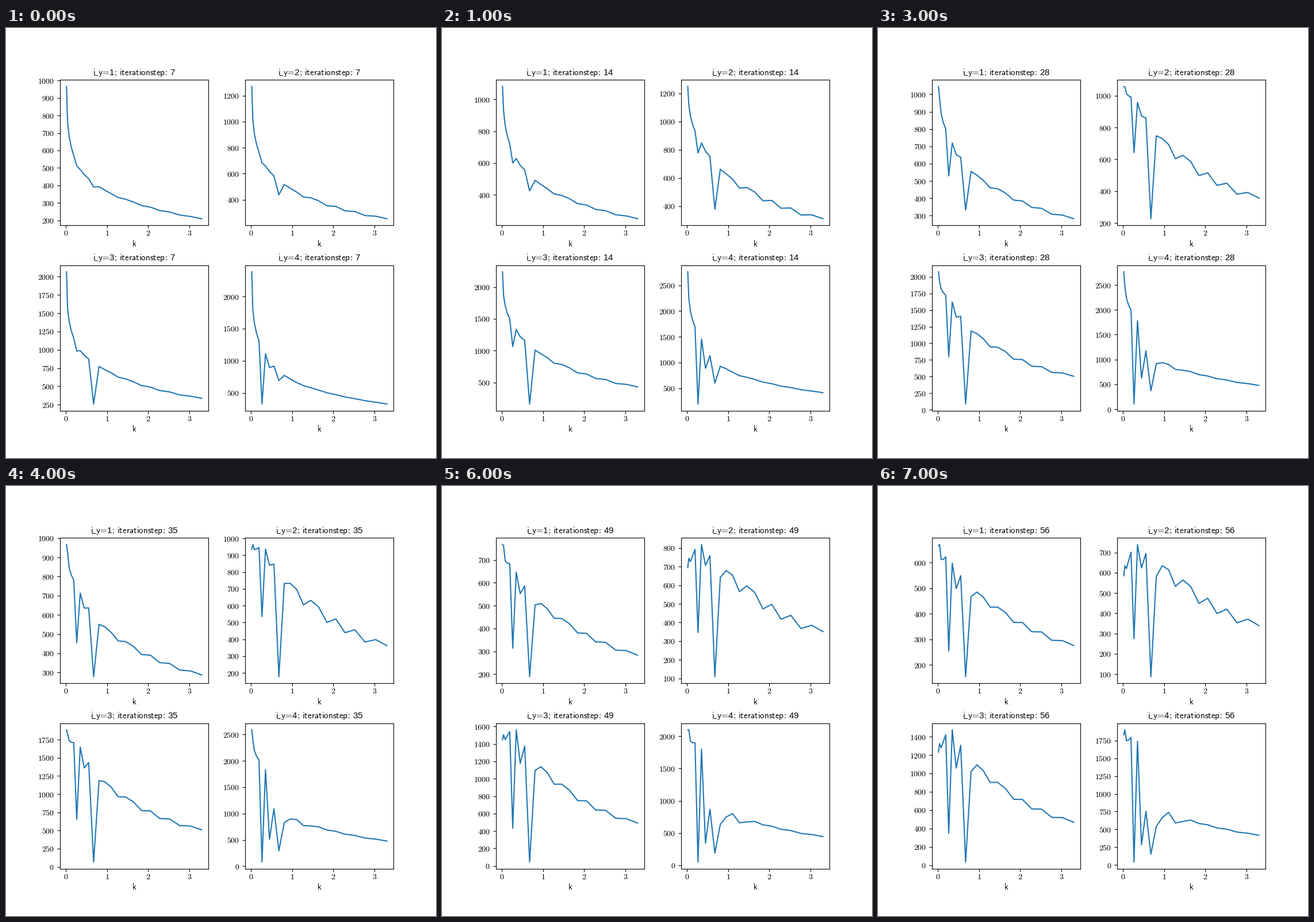
These frames come from a looping animation (748x748 px, 8 s). A matplotlib script:

```python
import numpy as np
import matplotlib.pyplot as plt
from matplotlib.animation import FuncAnimation
from matplotlib.ticker import FuncFormatter

plt.rcParams["mathtext.fontset"] = "cm"

SIZE = 748
FRAMES, STEP = 8, 7
KEY_STEPS = np.array([7, 28, 56])
KEY_MODES = np.array([0, 1, 6, 12, 22])
WEAK_DIPS = {2: 170, 3: 220}       # mode: onset step, in every panel
RIPPLE_MODES = [13, 16, 18, 20]

mode = np.arange(23)
k = (0.134 + 0.0765 * mode) ** 2

fig, axes = plt.subplots(2, 2, figsize=(SIZE / 100, SIZE / 100), dpi=100)
fig.subplots_adjust(left=93.5 / SIZE, right=674.4 / SIZE,
                    bottom=1 - 665.6 / SIZE, top=1 - 90.3 / SIZE,
                    wspace=0.246, hspace=0.274)
number = FuncFormatter(lambda v, _: f"${v:g}$")

ripple = np.where((mode > 13) & (mode < 22), 0.3, 0.0)
ripple[RIPPLE_MODES] = -1


def growth(n):
    """Terms of the law log v = a + b log n + c n^1.5."""
    n = np.asarray(n, float)
    return np.stack([np.ones_like(n), np.log(n), n ** 1.5], axis=-1)


def spacing(j):
    """Mode axis on which the smooth log curve is nearly straight."""
    return j ** 0.6 + 0.005 * j ** 2


class Panel:
    """A smooth growing and fading spectrum with dips that deepen in time."""

    def __init__(self, index, key_values, ripple_size, dips):
        self.index = index
        self.ax = axes.flat[index - 1]
        self.coef = np.linalg.solve(growth(KEY_STEPS), np.log(key_values))
        self.ripple_size = ripple_size
        self.dips = WEAK_DIPS | dips
        self.line, = self.ax.plot(k, self.curve(STEP), color="#1f77b4", lw=1.5)
        self.ax.xaxis.set_major_formatter(number)
        self.ax.yaxis.set_major_formatter(number)
        self.ax.tick_params(axis="x", pad=1.6)
        self.ax.set_xlabel(r"$\mathsf{k}$", fontsize=10, labelpad=2.4)

    def curve(self, n):
        log_v = np.interp(spacing(mode), spacing(KEY_MODES),
                          growth(n) @ self.coef)
        log_v += self.ripple_size * (1 - np.exp(-n / 15)) * ripple
        for j, onset in self.dips.items():
            log_v[j] -= 0.6 * np.log1p((n / onset) ** 2)
        return np.exp(log_v)

    def show(self, n):
        self.line.set_ydata(self.curve(n))
        self.ax.relim()
        self.ax.autoscale_view()
        self.ax.set_title(
            rf"$\mathsf{{i\!\_y\!=\!}}${self.index}"
            rf"$\mathsf{{;\,iterationstep\!:\,}}${n}",
            fontsize=10.9, fontname="Liberation Sans")


# Rows: curve heights at KEY_STEPS; columns: at KEY_MODES.
panels = [
    Panel(1, [[965, 760, 490, 353, 210],
              [1045, 975, 719, 503, 282],
              [665, 670, 597, 465, 276]],
          0.04, {5: 31, 7: 110, 9: 21.6, 10: 150}),
    Panel(2, [[1270, 1010, 658, 459, 253],
              [1057, 1055, 957, 693, 357],
              [585, 635, 739, 615, 339]],
          0.09, {5: 28, 7: 110, 9: 10.3, 10: 120}),
    Panel(3, [[2065, 1560, 990, 685, 338],
              [2075, 1930, 1620, 1068, 503],
              [1232, 1325, 1475, 1030, 468]],
          0.06, {5: 18, 7: 74, 9: 2.9, 10: 114}),
    Panel(4, [[2385, 1790, 1105, 660, 326],
              [2765, 2470, 1780, 900, 478],
              [1830, 1900, 1738, 740, 418]],
          0.02, {5: 2.5, 7: 14.5, 8: 46, 9: 10.8, 10: 43,
                 11: 78, 13: 105, 14: 140}),
]


def update(frame):
    for panel in panels:
        panel.show(STEP * (frame + 1))


anim = FuncAnimation(fig, update, frames=FRAMES, interval=1000,
                     init_func=lambda: update(0), repeat=True, repeat_delay=0)
plt.show()
```
